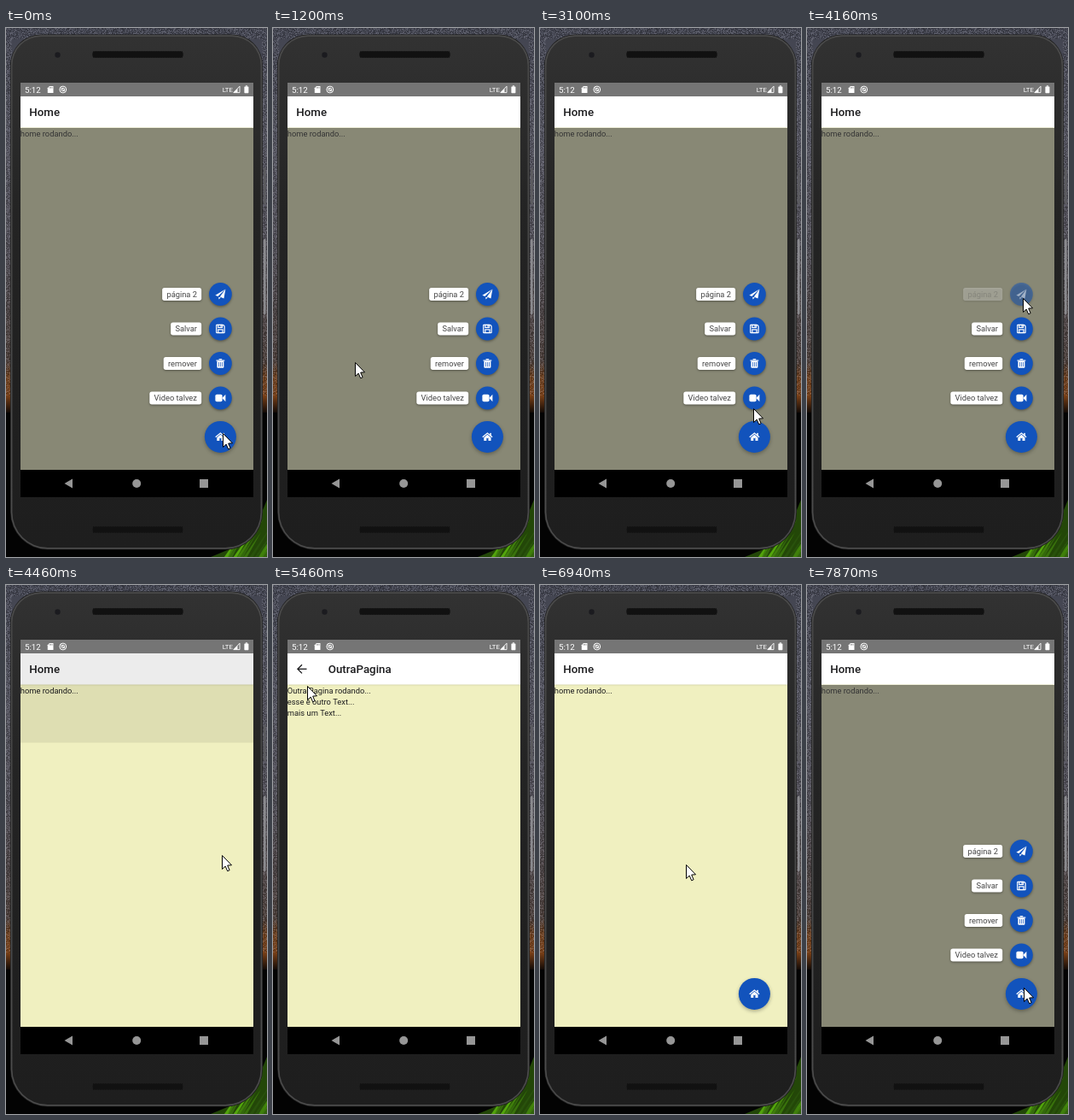
Recreate the animation shown at these times as an HTML page with a canvas. Size 306 by 619 pixels, loop 7990 ms.

```html
<!DOCTYPE html>
<html lang="pt">
<head>
<meta charset="utf-8">
<title>Menu flutuante</title>
<style>
html, body { margin: 0; width: 100%; height: 100%; overflow: hidden; background: #000; }
canvas { display: block; width: 306px; height: 619px; }
</style>
</head>
<body>
<canvas id="stage"></canvas>
<script>
const W = 306, H = 619, LOOP = 7990, STEP = LOOP / 60;
const ratio = window.devicePixelRatio || 1;
const FONT = 'Roboto, "Noto Sans", sans-serif';
const BLUE = '#1253bc', CREAM = '#f0f0c0', INK = '#1c1c1e', GREY = '#969696';
const LEFT = 17, TOP = 80, WIDE = 273, TALL = 437, BOTTOM = TOP + TALL;
const FAB = { x: 251.4, y: 478.4, r: 18.5 };

// Pointer moves: when each starts and ends, and where it lands
const REST = { x: 254, y: 474 };
const MOVES = [
  { from: 0, to: 1200, x: 96, y: 391 },
  { from: 1870, to: 2400, x: 249, y: 475 },
  { from: 2930, to: 3640, x: 253, y: 316 },
  { from: 4400, to: 4700, x: 240, y: 321 },
  { from: 4900, to: 5460, x: 40, y: 118 },
  { from: 5460, to: 5850, x: 36, y: 95 },
  { from: 6400, to: 7250, x: 254, y: 471 }
];

const ITEMS = [['página 2', plane], ['Salvar', disk], ['remover', bin], ['Video talvez', camera]];

const clamp = v => Math.max(0, Math.min(1, v));
const ramp = (t, a, b) => clamp((t - a) / (b - a));
const between = (t, a, b) => t >= a && t < b;
const easeOut = v => 1 - (1 - v) ** 3;
const mix = (a, b, k) => a + (b - a) * k;

function makeCanvas(el) {
  el.width = W * ratio;
  el.height = H * ratio;
  const ctx = el.getContext('2d');
  ctx.scale(ratio, ratio);
  return ctx;
}

function seeded(seed) {
  return () => (seed = (seed * 16807) % 2147483647) / 2147483647;
}

const stage = makeCanvas(document.getElementById('stage'));
let c = stage;

function layer(draw) {
  c.save();
  draw();
  c.restore();
}

function rect(x, y, w, h, fill) {
  c.fillStyle = fill;
  c.fillRect(x, y, w, h);
}

function rounded(x, y, w, h, r, fill) {
  c.beginPath();
  c.roundRect(x, y, w, h, r);
  c.fillStyle = fill;
  c.fill();
}

function disc(x, y, r, fill) {
  c.beginPath();
  c.arc(x, y, r, 0, Math.PI * 2);
  c.fillStyle = fill;
  c.fill();
}

function ring(x, y, r, color, width) {
  c.beginPath();
  c.arc(x, y, r, 0, Math.PI * 2);
  c.strokeStyle = color;
  c.lineWidth = width;
  c.stroke();
}

function trace(points) {
  c.beginPath();
  for (let i = 0; i < points.length; i += 2) c.lineTo(points[i], points[i + 1]);
}

function poly(points, fill) {
  trace(points);
  c.fillStyle = fill;
  c.fill();
}

function line(points, color, width) {
  trace(points);
  c.strokeStyle = color;
  c.lineWidth = width;
  c.stroke();
}

function label(text, x, y, size, color, weight = 400) {
  c.font = `${weight} ${size}px ${FONT}`;
  c.fillStyle = color;
  c.fillText(text, x, y);
}

function shadow(y, blur, alpha) {
  c.shadowColor = `rgba(0,0,0,${alpha})`;
  c.shadowOffsetY = y * ratio;
  c.shadowBlur = blur * ratio;
}

function fade(y0, y1, ...stops) {
  const g = c.createLinearGradient(0, y0, 0, y1);
  stops.forEach((color, i) => g.addColorStop(i / (stops.length - 1), color));
  return g;
}

// Icons, centred on 0,0
function plane() {
  poly([-6, 1.2, 6, -6, -3, 2.5], '#fff');
  poly([6, -6, 4, 5, -0.6, 3.1], '#fff');
  poly([-2, 3.3, 0.4, 4, -2, 6], '#fff');
}

function disk() {
  c.strokeStyle = '#fff';
  c.lineWidth = 1.2;
  c.beginPath();
  c.roundRect(-4.7, -4.7, 9.4, 9.4, [0.5, 2.5, 0.5, 0.5]);
  c.stroke();
  c.strokeRect(-2.6, 0.9, 5.2, 3.6);
  c.strokeRect(-2.6, -4.5, 4.6, 3);
  rect(0, -4.2, 1.1, 2, '#fff');
}

function bin() {
  rounded(-4, -3, 8, 8.3, 1, '#fff');
  rect(-4.9, -4, 9.8, 1.2, '#fff');
  rect(-1.8, -5.4, 3.6, 1.2, '#fff');
  for (const x of [-2, 0, 2]) rect(x - 0.35, -1.5, 0.7, 5.2, BLUE);
}

function camera() {
  rounded(-6, -4.3, 8.2, 8.6, 1.8, '#fff');
  poly([2, 0, 6, -4.2, 6, 4.2], '#fff');
}

function house() {
  line([-5.7, 0.4, 0, -4.3, 5.7, 0.4], '#fff', 1.3);
  rect(2.9, -4.5, 1.5, 3.2, '#fff');
  poly([-4.1, 0.8, 0, -2.6, 4.1, 0.8], '#fff');
  rect(-4.1, 0.7, 3, 3.9, '#fff');
  rect(1.1, 0.7, 3, 3.9, '#fff');
  rect(-1.2, 0.7, 2.4, 1, '#fff');
}

function backdrop() {
  const random = seeded(7);
  const horizon = 450;
  rect(0, 0, W, H, '#030303');
  rect(0, 0, W, horizon - 60, fade(0, horizon - 60, '#424450', '#53535e', '#504e56', '#4a3d38'));
  rect(0, horizon - 60, W, 60, fade(horizon - 60, horizon, '#4a3d38', '#71401c', '#7a4017', '#120a06'));
  for (let y = 0; y < horizon - 20; y++) {
    for (let x = 0; x < W; x++) {
      if (y > 12 && x > 6 && x < 300) continue;
      const bright = random() < 0.5;
      rect(x, y, 1, 1, `rgba(${bright ? '190,190,205' : '0,0,0'},${random() * 0.28})`);
    }
  }
  // Leaves in the lower right corner
  poly([W, 552, 286, 600, 240, H, W, H], '#234708');
  for (let i = 0; i < 22; i++) {
    const x = mix(245, 312, random()), reach = mix(15, 45, random());
    const green = Math.round(mix(70, 185, random()));
    poly([x, H, x + reach * 0.7, H - reach, x + 4, H], `rgb(${green * 0.5 | 0},${green},12)`);
  }
}

function grille(y) {
  rounded(101, y, 107, 8, 4, '#1a1a1a');
  for (let row = 0; row < 7; row++)
    for (let x = 102 + row % 2; x < 207; x += 2) rect(x, y + 0.5 + row, 1, 1, '#080808');
}

function phone() {
  rounded(302, 164, 2.6, 42, 1, '#5c5c60');
  rounded(302, 247, 2.6, 88, 1, '#8a8a8e');
  const shell = (inset, fill) => rounded(5 + inset, 7.5 + inset, 296 - inset * 2, 603 - inset * 2,
    [36, 36, 44, 44].map(r => r - inset), fill);
  shell(0, '#1d1d1d');
  shell(0.7, '#4b4b4b');
  shell(2.4, fade(10, 608, '#323232', '#242424', '#202020', '#1e1e1e'));
  disc(60.5, 31.5, 3.2, '#1b1b1f');
  grille(27);
  grille(583);
}

function statusBar() {
  rect(LEFT, 64, WIDE, 16, '#757575');
  label('5:12', 22, 75.6, 9.7, '#fff');
  poly([51, 68, 55.5, 68, 55.5, 76, 48.8, 76, 48.8, 70.2], '#fff');
  for (const x of [51, 52.5, 54]) rect(x - 0.3, 69, 0.7, 1.6, '#757575');
  ring(66.8, 72, 3.9, '#fff', 1);
  ring(66.8, 72, 1.8, '#fff', 1);
  line([64.3, 69.5, 69.3, 74.5], '#fff', 0.9);
  label('LTE', 253.7, 74.8, 7.8, '#fff');
  line([266.8, 75.6, 274, 68.2, 274, 75.6, 266.8, 75.6], '#fff', 0.9);
  poly([271.5, 71, 271.5, 75.6, 266.8, 75.6], '#fff');
  rounded(279.4, 68.4, 5, 7.8, 0.7, '#fff');
  rect(280.8, 67.4, 2.2, 1.2, '#fff');
}

function navBar() {
  rect(LEFT, BOTTOM, WIDE, 32, '#000');
  poly([68.5, 533, 78, 527.6, 78, 538.4], GREY);
  disc(153.2, 533, 5, GREY);
  rect(227, 528, 10, 10, GREY);
}

function page(title, x, lines) {
  rect(LEFT, TOP, WIDE, TALL, CREAM);
  layer(() => {
    shadow(0.8, 2, 0.16);
    rect(LEFT, TOP, WIDE, 36.5, '#fff');
  });
  label(title, x, 103.4, 13.3, INK, 500);
  lines.forEach((text, i) => label(text, 16.8, 127.2 + i * 12.8, 9.35, INK));
}

function menuItem([text, icon], i, grow, pressed) {
  const y = 311.5 + i * 40.5, pad = 5.3, right = 229.2;
  c.font = `400 9.3px ${FONT}`;
  const left = right - c.measureText(text).width - pad * 2;
  layer(() => {
    c.translate(0, (1 - grow) * (ITEMS.length - i) * 12);
    c.globalAlpha = grow * (pressed ? 0.28 : 1);
    layer(() => {
      shadow(1, 2.5, 0.4);
      rounded(left, y - 7.5, right - left, 15, 2.7, '#fff');
    });
    label(text, left + pad, y + 3.2, 9.3, '#444');
    c.globalAlpha = grow * (pressed ? 0.5 : 1);
    layer(() => {
      shadow(1.5, 3, 0.35);
      disc(FAB.x, y, 13.4, BLUE);
    });
    c.translate(FAB.x, y);
    icon();
  });
}

function fab(held) {
  layer(() => {
    shadow(1.8, 4, 0.3);
    disc(FAB.x, FAB.y, FAB.r, BLUE);
  });
  layer(() => {
    if (held) {
      c.beginPath();
      c.arc(FAB.x, FAB.y, FAB.r, 0, Math.PI * 2);
      c.clip();
      disc(FAB.x - 4, FAB.y - 2, FAB.r, '#1547a0');
    }
    c.translate(FAB.x, FAB.y);
    house();
  });
}

function homePage(t) {
  const open = t < 1590 || between(t, 2790, 4250) || t >= 7700;
  const start = t > 7000 ? 7640 : t > 2000 ? 2740 : -LOOP;
  const grow = easeOut(ramp(t, start, start + 200));
  const picked = between(t, 4100, 4250);
  page('Home', 27.3, ['home rodando...']);
  if (open) {
    rect(LEFT, 117, WIDE, BOTTOM - 117, 'rgba(68,68,68,.6)');
    ITEMS.forEach((item, i) => menuItem(item, i, grow, picked && i === 0));
  }
  fab(between(t, 2660, 2790) || between(t, 7590, 7700));
}

function otherPage() {
  page('OutraPagina', 64.8, ['Outra Pagina rodando...', 'esse é outro Text...', 'mais um Text...']);
  line([39.5, 98.3, 29, 98.3], INK, 1.3);
  line([34, 93.2, 28.9, 98.3, 34, 103.4], INK, 1.3);
}

function clipScreen(share) {
  c.beginPath();
  c.rect(LEFT, BOTTOM - TALL * share, WIDE, TALL * share);
  c.clip();
}

function screen(t) {
  // The second page is uncovered from the bottom edge and closes the same way.
  const shown = easeOut(ramp(t, 4220, 4680)) - easeOut(ramp(t, 6110, 6570));
  clipScreen(1);
  if (shown < 1) homePage(t);
  if (shown > 0) {
    rect(LEFT, TOP, WIDE, TALL, `rgba(0,0,0,${0.1 * shown})`);
    clipScreen(shown);
    c.translate(0, (1 - shown) * 9);
    otherPage();
  }
}

function pointer(t) {
  const spot = MOVES.reduce((p, m) => {
    const k = ramp(t, m.from, m.to);
    return { x: mix(p.x, m.x, k), y: mix(p.y, m.y, k) };
  }, REST);
  layer(() => {
    c.translate(Math.round(spot.x) + 0.5, Math.round(spot.y) + 0.5);
    trace([0, 0, 0, 16, 3.7, 12.6, 6.2, 18.3, 8.6, 17.2, 6.2, 11.6, 11, 11.3]);
    c.closePath();
    c.fillStyle = '#fff';
    c.fill();
    c.strokeStyle = '#000';
    c.lineWidth = 1;
    c.stroke();
  });
}

const still = document.createElement('canvas');
c = makeCanvas(still);
backdrop();
phone();
statusBar();
navBar();
c = stage;

function render(time) {
  // The picture advances in even steps, like a screen recording.
  const t = Math.floor((time % LOOP + 5) / STEP) * STEP;
  c.drawImage(still, 0, 0, W, H);
  layer(() => screen(t));
  pointer(t);
}

const origin = performance.now();
function frame() {
  render(performance.now() - origin);
  requestAnimationFrame(frame);
}
frame();
</script>
</body>
</html>
```
